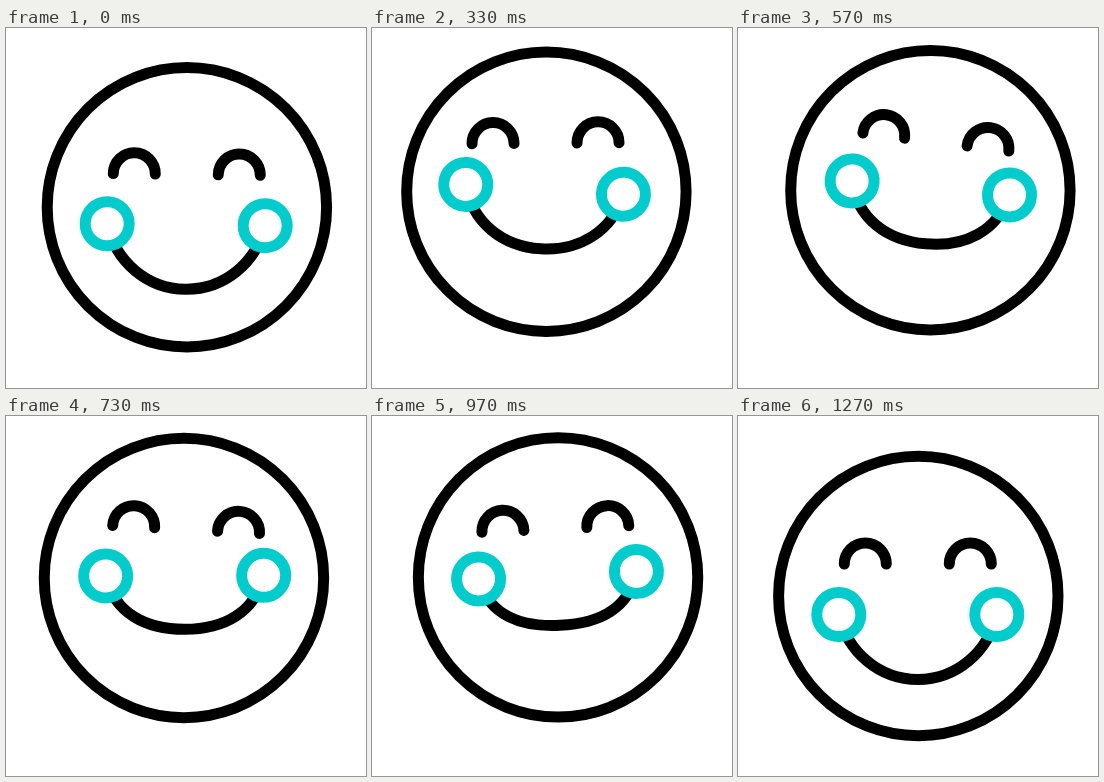
Animation, 360 px wide and 360 px high, one loop 1.67 s. Source, as an HTML page:

```html
<!DOCTYPE html>
<html lang="en">
<head>
<meta charset="utf-8">
<title>Laughing face</title>
<style>
  html, body { margin: 0; height: 100%; overflow: hidden; background: #fff; }
  svg { display: block; width: 100vw; height: 100vh; }
</style>
</head>
<body>
<svg viewBox="0 0 360 360" fill="none" stroke="#000" stroke-width="11" stroke-linecap="round">
  <g id="head">
    <circle r="139.7"/>
    <g id="eyes">
      <path d="M-74-32a21 21 0 0 1 42 0M31-32a21 21 0 0 1 42 0"/>
    </g>
    <g id="smile">
      <path id="mouth"/>
      <g fill="#fff" stroke="#04cccc">
        <circle cx="-79.5" cy="18.5" r="22"/>
        <circle cx="78.5" cy="18.5" r="22"/>
      </g>
    </g>
  </g>
</svg>
<script>
const LOOP = 1670, STEP = 100 / 3, LAST_STEP = 38;
const START = -33, RETURN = 1000, END = 1267;
const [head, eyes, smile, mouth] =
  ["head", "eyes", "smile", "mouth"].map(id => document.getElementById(id));

const smooth = p => (1 - Math.cos(Math.PI * p)) / 2;

// Value at time t along [time, value] keys, eased between neighbours.
function track(keys, t, ease = smooth) {
  const i = keys.findIndex(([time]) => time >= t);
  if (i < 0) return keys[keys.length - 1][1];
  if (i === 0) return keys[0][1];
  const [t0, v0] = keys[i - 1], [t1, v1] = keys[i];
  return v0 + (v1 - v0) * ease((t - t0) / (t1 - t0));
}

const headX = [[START, 180.3], [203, 192.7], [435, 162], [610, 197.5], [825, 165.7], [1065, 197.5], [END, 180.3]];
const headY = [[START, 180], [200, 164.3], [570, 162.2], [RETURN, 161.4], [END, 180]];
const eyeTilt = [[START, 0], [203, 14], [425, -8.7], [640, 12.6], [830, -6.9], [1065, 0], [END, 0]];
const smileTilt = [[START, 0], [203, 14.3], [425, -2.6], [610, 6.2], [830, -4.6], [1065, -1.6], [END, 0]];
const lift = [[START, 0], [200, 1], [RETURN, 1], [END, 0]];
const mouthDepth = [[START, 65], [RETURN, 49.7], [END, 65]];

function mouthPath(depth) {
  const top = 18.5, bottom = top + depth, side = top + 37.5;
  return `M-79.5 ${top}C-70.9 ${side} -39.1 ${bottom} -.5 ${bottom}S69.9 ${side} 78.5 ${top}`;
}

function draw(now) {
  const t = Math.min(LAST_STEP, Math.floor((now % LOOP + 4) / STEP)) * STEP;
  const tilt = track(eyeTilt, t), up = track(lift, t);
  const depth = track(mouthDepth, t, t < RETURN ? p => p : smooth);
  head.setAttribute("transform", `translate(${track(headX, t)} ${track(headY, t)})`);
  eyes.setAttribute("transform", `rotate(${tilt}) translate(0 ${-16.5 * up})`);
  smile.setAttribute("transform",
    `rotate(${tilt}) translate(0 ${-20.8 * up}) rotate(${track(smileTilt, t) - tilt})`);
  mouth.setAttribute("d", mouthPath(depth));
}

const begin = performance.now();
function frame() {
  draw(performance.now() - begin);
  requestAnimationFrame(frame);
}
frame();
</script>
</body>
</html>
```
